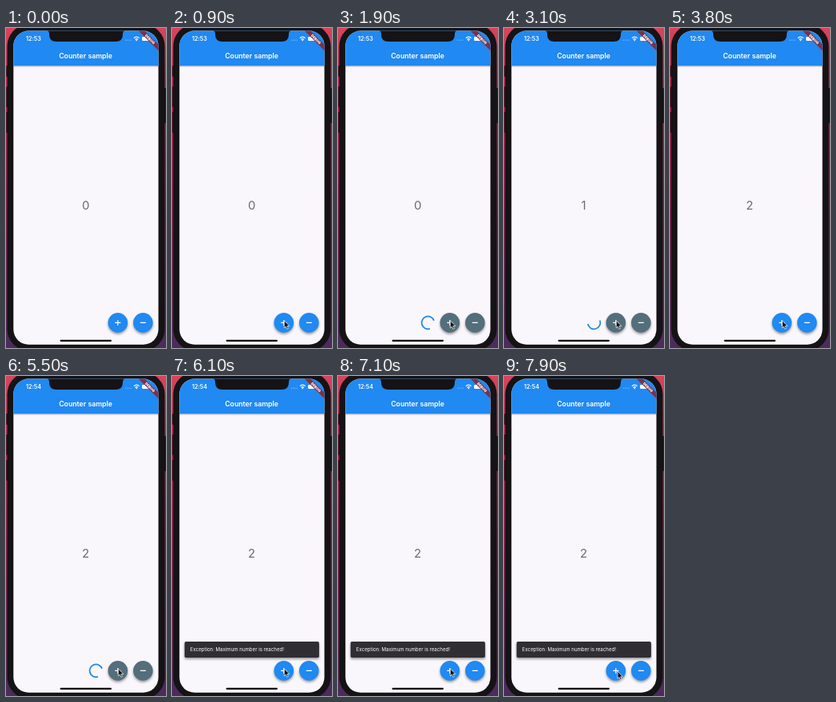
These frames come from a looping animation (200 px wide and 400 px high, 8000 ms). An HTML page:

```html
<!DOCTYPE html>
<html lang="en">
<head>
<meta charset="utf-8">
<title>Counter sample</title>
<style>
  html, body { margin: 0; width: 100%; height: 100%; overflow: hidden; background: #111; }
  svg { display: block; width: 100vw; height: 100vh; }
  text { font-family: Inter, Roboto, sans-serif; fill: #fff; }
  .fab { filter: drop-shadow(0 2px 1.6px rgba(0, 0, 0, .38)); }
</style>
</head>
<body>
<svg viewBox="0 0 200 400">
  <defs>
    <linearGradient id="wall" x2="0" y2="1">
      <stop offset="0" stop-color="#d5455c"/>
      <stop offset=".25" stop-color="#b52048"/>
      <stop offset=".6" stop-color="#7e1f4b"/>
      <stop offset="1" stop-color="#4a2c5c"/>
    </linearGradient>
    <linearGradient id="barShade" x2="0" y2="1">
      <stop offset="0" stop-opacity=".25"/>
      <stop offset="1" stop-opacity="0"/>
    </linearGradient>
    <clipPath id="screen"><rect x="9.3" y="3.5" width="181.2" height="392.3" rx="19"/></clipPath>
  </defs>

  <rect width="200" height="400" fill="url(#wall)"/>
  <g fill="#151316">
    <rect x="1.5" y="-4.5" width="197" height="408" rx="27"/>
    <rect x=".4" y="47" width="3" height="14" rx="1"/>
    <rect x=".4" y="73" width="3" height="26" rx="1"/>
    <rect x=".4" y="105" width="3" height="26" rx="1"/>
    <rect x="197" y="75" width="2.8" height="44" rx="1"/>
  </g>

  <g clip-path="url(#screen)">
    <rect width="200" height="400" fill="#f9f7fb"/>
    <rect y="47" width="200" height="2.6" fill="url(#barShade)"/>
    <rect width="200" height="47.2" fill="#2089f2"/>
    <path d="M50 3H150Q146 3 146 7.5V8Q146 17 137 17H63Q54 17 54 8V7.5Q54 3 50 3Z" fill="#151316"/>
    <text id="clock" x="25" y="16.4" font-size="7.2" font-weight="600"></text>
    <path d="M149 15.2h8" stroke="#fff" stroke-opacity=".55" stroke-dasharray="1 1.2"/>
    <g fill="none" stroke="#fff" stroke-width="1.2">
      <path d="M159.8 12.6a4.8 4.8 0 0 1 6.8 0"/>
      <path d="M161.4 14.3a2.5 2.5 0 0 1 3.6 0"/>
    </g>
    <circle cx="163.2" cy="15.6" r=".8" fill="#fff"/>
    <rect x="170" y="11" width="10.5" height="5" rx="1.3" fill="#fff"/>
    <text x="99.6" y="38.3" font-size="8.74" font-weight="600" text-anchor="middle">Counter sample</text>
    <g transform="translate(180 14) rotate(45)">
      <rect x="-20" y="-2.7" width="40" height="5.4" fill="#7d3148"/>
      <text y="1.6" font-size="4.4" font-weight="900" text-anchor="middle">DEBUG</text>
    </g>

    <text id="count" x="99.6" y="226.6" font-size="14.9" text-anchor="middle" style="fill:#6d6b6e"></text>
    <path id="spinner" fill="none" stroke="#2089e6" stroke-width="1.75"/>
    <g id="fabs">
      <circle class="fab" cx="139.8" cy="368.4" r="12.3"/>
      <circle class="fab" cx="171.3" cy="368.4" r="12.3"/>
    </g>
    <path d="M136.3 368.4h7M139.8 364.9v7M167.8 368.4h7" stroke="#fff" stroke-width="1.1"/>
    <g id="snack">
      <rect class="fab" x="15.7" y="332" width="168.2" height="20" rx="1.8" fill="#302e32"/>
      <text x="22.8" y="344.2" font-size="6.1">Exception: Maximum number is reached!</text>
    </g>
    <rect x="67.5" y="389.7" width="64.5" height="2.2" rx="1.1" fill="#0b0a0c"/>
  </g>

  <path id="cursor" d="M0 0V9.2L2.1 7.3L3.5 10.5L5.1 9.8L3.7 6.7H6.5Z" fill="#111" stroke="#fff" stroke-width=".7"/>
</svg>

<script>
  const LOOP = 8000, STEP = 100, LOAD = 1000;
  const presses = [1200, 2800, 4800];
  const $ = id => document.getElementById(id);
  const clamp = v => Math.min(1, Math.max(0, v));
  const smooth = v => v * v * (3 - 2 * v);

  // cubic-bezier(.4, 0, .2, 1)
  function fastOutSlowIn(x) {
    let lo = 0, hi = 1, s = .5;
    for (let i = 0; i < 20; i++) {
      s = (lo + hi) / 2;
      const bx = 1.2 * s * (1 - s) ** 2 + .6 * s * s * (1 - s) + s ** 3;
      if (bx < x) lo = s; else hi = s;
    }
    return 3 * s * s * (1 - s) + s ** 3;
  }

  // Indeterminate spinner: the head runs ahead, then the tail catches up
  function arc(age) {
    const phase = age % 1333 / 1333;
    const head = fastOutSlowIn(clamp(phase * 2));
    const tail = fastOutSlowIn(clamp(phase * 2 - 1));
    const start = Math.PI * (-.5 + tail * 1.5 + age / 2222 * 2 + phase / 2);
    const sweep = Math.max((head - tail) * 1.5 * Math.PI, .02);
    const point = a => `${112.5 + 7.9 * Math.cos(a)} ${368.4 + 7.9 * Math.sin(a)}`;
    return `M${point(start)}A7.9 7.9 0 ${+(sweep > Math.PI)} 1 ${point(start + sweep)}`;
  }

  function draw(t) {
    const pressed = presses.find(p => t >= p && t < p + LOAD);
    const loading = pressed !== undefined;
    $('spinner').setAttribute('d', loading ? arc(t - pressed) : '');
    $('fabs').setAttribute('fill', loading ? '#546e7c' : '#2089f2');
    $('count').textContent = presses.slice(0, 2).filter(p => t >= p + LOAD).length;
    $('clock').textContent = t < 5400 ? '12:53' : '12:54';

    const shown = (t - presses[2] - LOAD) / 250;
    $('snack').setAttribute('opacity', fastOutSlowIn(clamp((shown - .4) / .6)));

    const enter = 1 - smooth(clamp((t - 200) / 500));
    const drift = smooth(clamp((t - 7400) / 400));
    const x = 140.3 + 62 * enter + 1.7 * drift;
    const y = 365.8 + 20 * enter + 3.4 * drift;
    $('cursor').setAttribute('transform', `translate(${x} ${y})`);
  }

  const begin = performance.now();
  function tick() {
    const t = (performance.now() - begin) % LOOP;
    draw(Math.floor(t / STEP) * STEP);
    requestAnimationFrame(tick);
  }
  tick();
</script>
</body>
</html>
```
